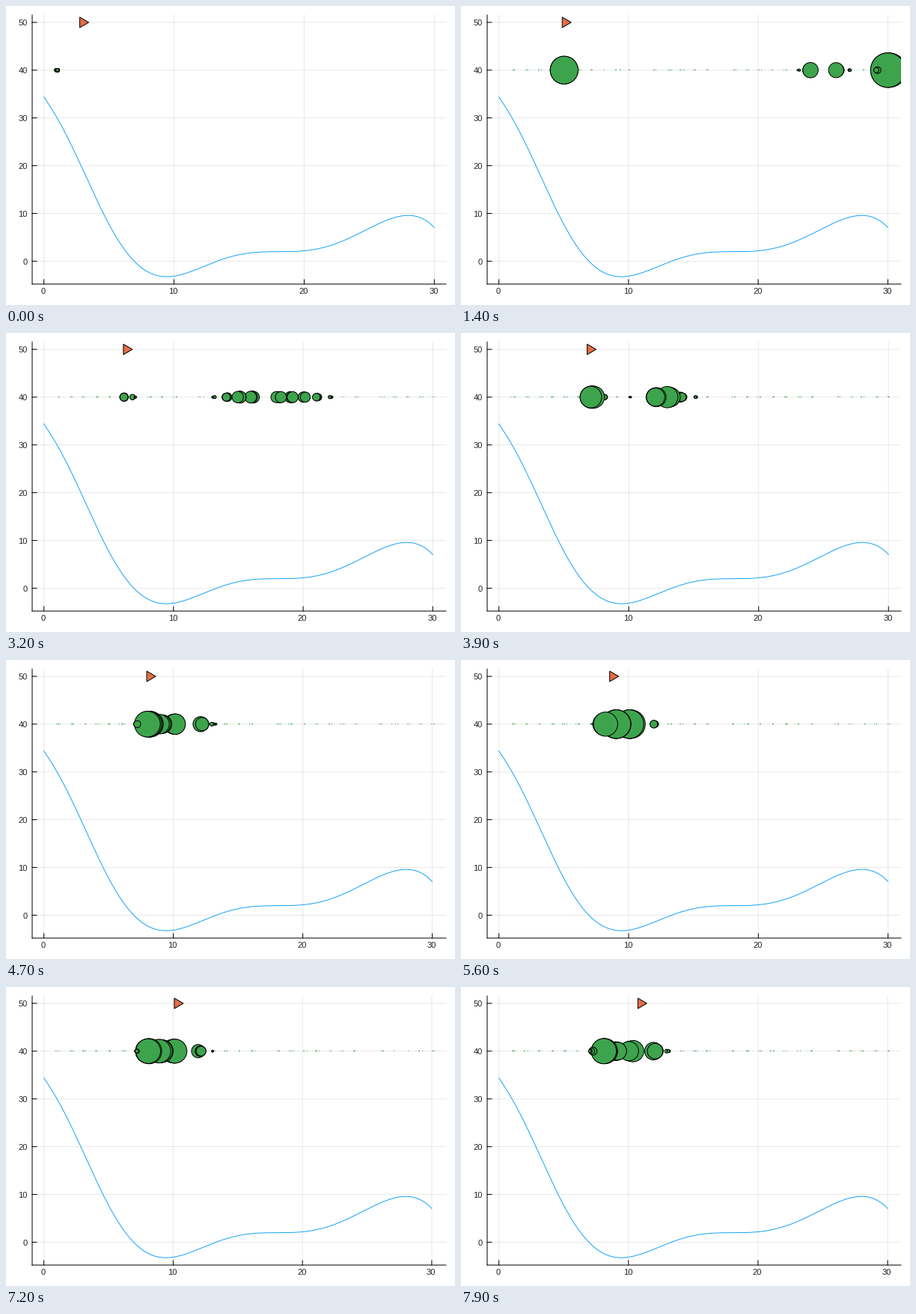
Animation of 600x400 px, one loop 8 s. Source, as a matplotlib script:

```python
import numpy as np
import matplotlib.pyplot as plt
from matplotlib.animation import FuncAnimation
from matplotlib.patches import Polygon, Rectangle

W, H, DPI = 600, 400, 100
FRAMES, STEP_MS = 80, 100
PX = 72 / DPI                       # one pixel in points
LEFT, RIGHT, TOP, BOTTOM = 35, 588, 12, 372
BLUE, ORANGE, GREEN = "#009AFA", "#E36F47", "#3DA44D"

# Terrain: a smooth curve through a few key points
terrain = np.polynomial.Polynomial.fit(
    [0, 1, 3, 6, 9.5, 13, 17, 21, 25, 28, 29, 30],
    [34.4, 30, 19.2, 3.1, -3.15, -0.4, 2, 2.55, 6.9, 9.6, 9, 7.05], 9)

# Particles start on whole cells, slightly denser on the left, with gaps
GAPS = (11, 17, 25)
CELLS = np.array([c for c in range(30, 0, -1) if c not in GAPS
                  for _ in range(round(5 - c / 15))], float)
SIGMA, SPREAD = 1.02, 235


def flight():
    """Plane positions, a random walk between waypoints, and altitude readings."""
    rng = np.random.default_rng(4)
    steps = np.arange(FRAMES)
    knots = [0, 14, 25, 39, 47, 65, 79]
    walk = np.cumsum(rng.normal(0, 0.06, FRAMES))
    pos = np.interp(steps, knots, [3.1, 5.23, 6.12, 7.14, 8.29, 9.74, 11.07])
    pos += walk - np.interp(steps, knots, walk[knots])
    return pos, terrain(pos) + rng.normal(0.1, 0.15, FRAMES)


PLANE, READING = flight()


def particles(i):
    """Particle positions and marker radii at step i."""
    rng = np.random.default_rng(100 + i)
    if i == 0:
        x = 1 + rng.normal(0.01, 0.03, CELLS.size)
        return x, np.full(x.size, SPREAD / x.size)
    x = CELLS + rng.normal(0.09, 0.1, CELLS.size)
    w = np.exp(-((terrain(x) - READING[i]) / SIGMA) ** 2 / 2)
    return x, SPREAD * w / w.sum()


def to_y(v):
    return 341.4 - 6.39 * v


def to_x(v, xmax):
    pad = (RIGHT - LEFT) * 0.03 / 1.06
    return LEFT + pad + (RIGHT - LEFT - 2 * pad) * v / xmax


fig = plt.figure(figsize=(W / DPI, H / DPI), dpi=DPI, facecolor="white")
ax = fig.add_axes([0, 0, 1, 1])
ax.set(xlim=(0, W), ylim=(H, 0))
ax.axis("off")
clip = Rectangle((LEFT, TOP), RIGHT - LEFT, BOTTOM - TOP,
                 transform=ax.transData)


def line(xs, ys, color="black", width=1.0, **kw):
    return ax.plot(xs, ys, color=color, lw=width * PX, snap=False, **kw)[0]


def label(x, y, text, ha):
    return ax.text(x, y, text, ha=ha, va="center_baseline", fontsize=8,
                   family="Liberation Sans", color="#222222")


for v in range(0, 51, 10):
    y = to_y(v)
    line([LEFT, RIGHT], [y, y], alpha=0.09)
    line([LEFT, LEFT + 6], [y, y])
    label(28.7, y + 0.6, str(v), "right")

xticks = []
for v in range(0, 31, 10):
    xticks.append((v, line([0, 0], [TOP, BOTTOM], alpha=0.09),
                   line([0, 0], [BOTTOM - 6, BOTTOM]),
                   label(0, 381.3, str(v), "center")))

line([LEFT, LEFT], [TOP, BOTTOM])
line([LEFT, RIGHT], [BOTTOM, BOTTOM])

grid_x = np.linspace(0, 30, 301)
curve = line(grid_x, to_y(terrain(grid_x)), BLUE, 0.9, zorder=3)
plane = Polygon(np.zeros((3, 2)), fc=ORANGE, ec="black", lw=PX, zorder=4)
ax.add_patch(plane)
dots = ax.plot([], [], ls="", marker=",", color=GREEN, zorder=5)[0]
discs = ax.scatter([], [], c=GREEN, edgecolors="black", linewidths=PX, zorder=6)
discs.set_clip_path(clip)


def update(i):
    x, r = particles(i)
    xmax = max(30, x.max())

    for v, grid, tick, text in xticks:
        px = to_x(v, xmax)
        grid.set_xdata([px, px])
        tick.set_xdata([px, px])
        text.set_x(px - 1)
    curve.set_xdata(to_x(grid_x, xmax))

    cx, cy = to_x(PLANE[i], xmax), to_y(50)
    plane.set_xy([(cx - 6, cy - 7), (cx + 6, cy), (cx - 6, cy + 7)])

    px, y = to_x(x, xmax), to_y(40)
    big = r >= 0.9
    dots.set_data(px[~big], np.full((~big).sum(), y + 0.6))
    discs.set_offsets(np.column_stack([px[big], np.full(big.sum(), y)]))
    discs.set_sizes((2 * r[big] * PX) ** 2)
    return []


anim = FuncAnimation(fig, update, frames=FRAMES, interval=STEP_MS,
                     repeat=True, repeat_delay=0, blit=False)
plt.show()
```
